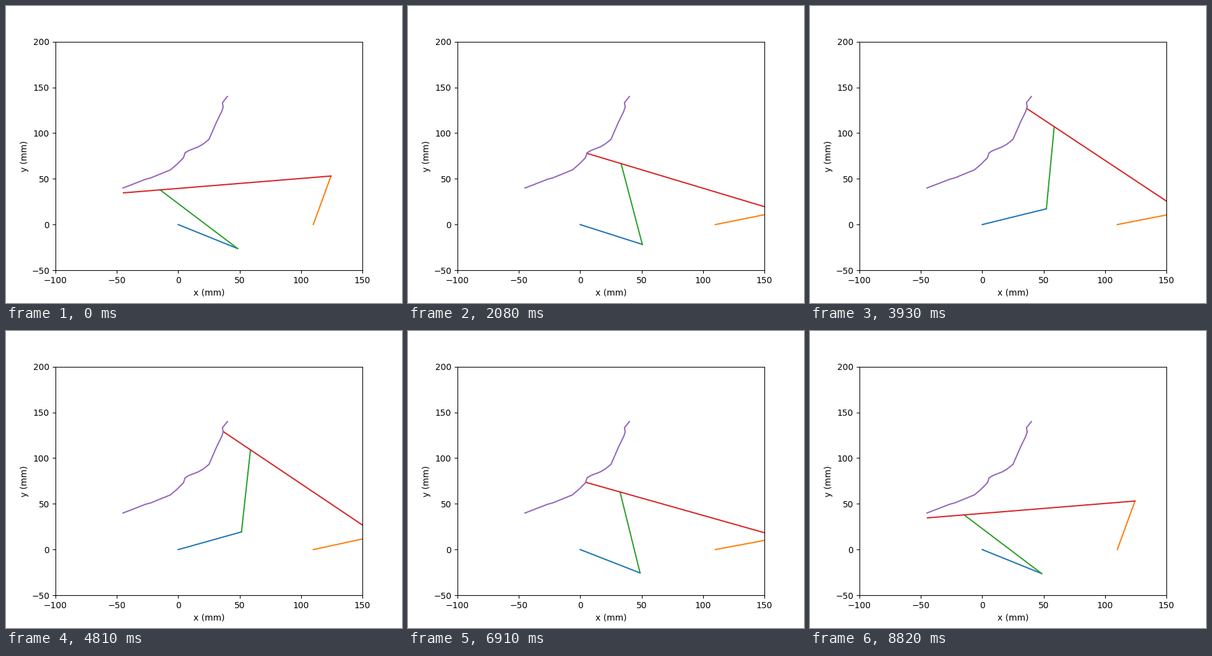
These frames come from a looping animation (640x480 px, 8.87 s). A matplotlib script:

```python
import numpy as np
import matplotlib.pyplot as plt
from matplotlib.animation import FuncAnimation

TICK, LOOP = 10, 8870               # ms
LEG, HOLD, STEP = 210, 50, 20       # ms per leg, rest at a stop, sub-step
SUBS = 9                            # sub-steps per leg
LAST = 21                           # stops 0..21, then back again

CRANK, COUPLER, ROD, REACH = 55, 90, 140, 170
LEFT, RIGHT = np.array([0.0, 0.0]), np.array([110.0, 0.0])
START = (-44.6, 34.7)               # the arm rests just below the curve

# Corners of the curve; stops inside straight runs are spaced evenly.
corners = np.array([
    (-45, 40), (-26.5, 49.6), (-22.5, 51), (-6.4, 59.8), (-0.8, 66.2),
    (4.2, 73), (5.6, 78.5), (8.7, 81), (16.2, 84.9), (20.2, 88), (25, 93.1),
    (31.2, 112.2), (35.4, 123.7), (36.6, 128.6), (36, 133.2), (40, 140),
])
stops = np.arange(LAST + 1)
corner_stops = np.delete(stops, [1, 4, 5, 7, 15, 17])


def along(s, at, points):
    """Points of a polyline at parameter s."""
    return np.transpose([np.interp(s, at, axis) for axis in points.T])


curve = along(stops, corner_stops, corners)
route = np.vstack([START, curve[1:]])


def meet(p, q, rp, rq):
    """Intersection of two circles, to the right of the direction p -> q."""
    d = np.hypot(*(q - p))
    u = (q - p) / d
    a = (rp**2 - rq**2 + d**2) / (2 * d)
    h = np.sqrt(max(rp**2 - a**2, 0))
    return p + a * u + h * np.array([u[1], -u[0]])


def tip_at(t):
    leg, rest = divmod(t, LEG)
    sub = 0 if rest < HOLD else (rest - HOLD) // STEP + 1
    return along(LAST - abs(LAST - leg - sub / SUBS), stops, route)


def links(tip):
    b = meet(RIGHT, tip, CRANK, REACH)
    c = tip + (b - tip) * (REACH - ROD) / REACH
    a = meet(LEFT, c, CRANK, COUPLER)
    return (LEFT, a), (RIGHT, b), (a, c), (tip, b)


fig, ax = plt.subplots(figsize=(6.4, 4.8), dpi=100)
bars = [ax.plot([], [])[0] for _ in range(4)]
ax.plot(*curve.T)
ax.set(xlim=(-100, 150), ylim=(-50, 200))
ax.set_xlabel("x (mm)")
ax.set_ylabel("y (mm)", labelpad=3.3)


def update(i):
    for bar, ends in zip(bars, links(tip_at(i * TICK))):
        bar.set_data(*np.transpose(ends))
    return bars


anim = FuncAnimation(fig, update, frames=LOOP // TICK, interval=TICK,
                     repeat=True, repeat_delay=0)
plt.show()
```
